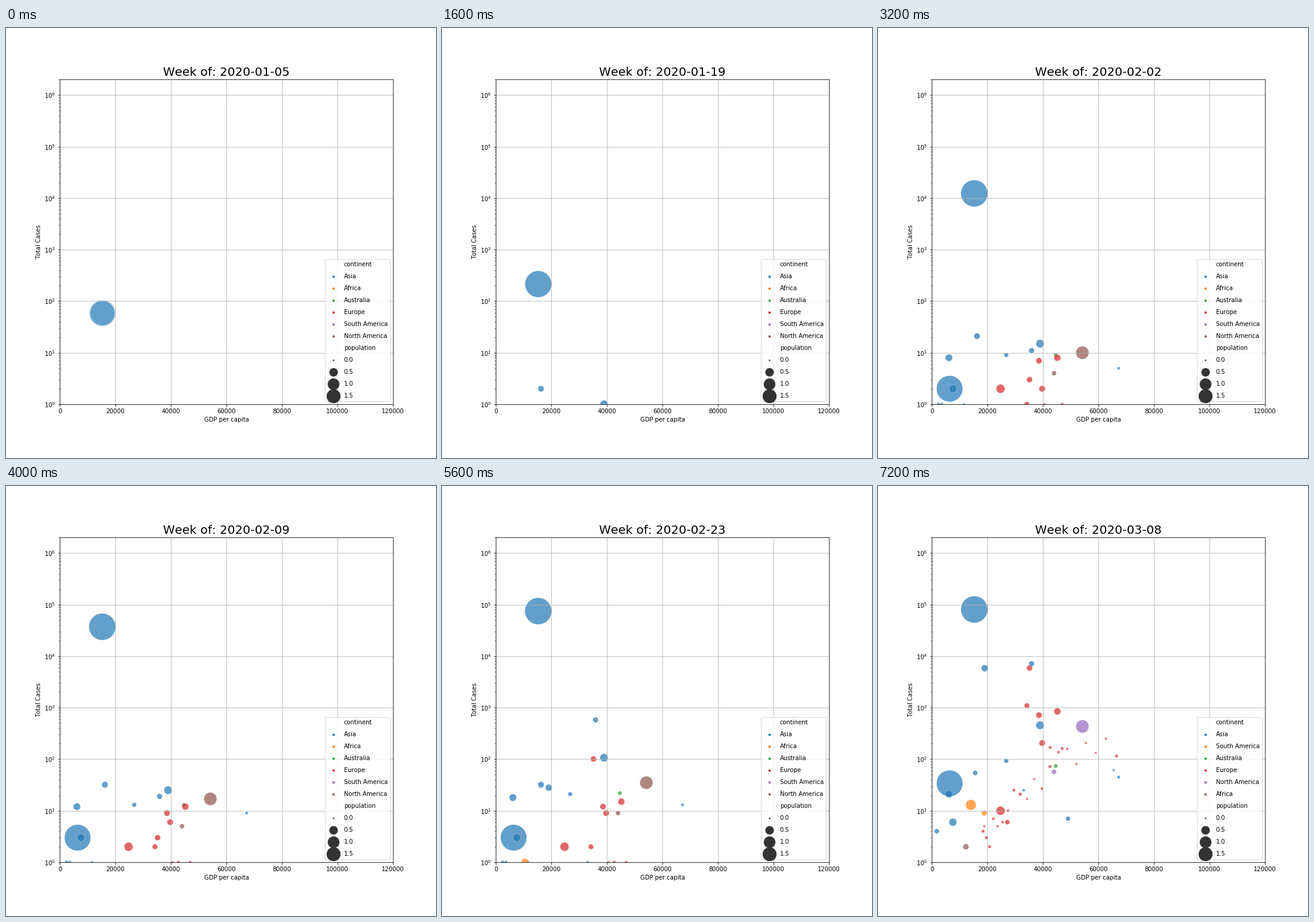
These frames come from a looping animation (720 px wide and 720 px high, 8 s). A matplotlib script:

```python
import numpy as np
import matplotlib.pyplot as plt
from matplotlib.animation import FuncAnimation
from matplotlib.ticker import LogLocator, NullFormatter

plt.rcParams["text.kerning_factor"] = 6

WEEKS = 10
LAST = WEEKS - 1
START = np.datetime64("2020-01-05")
ORDER = ["Asia", "Africa", "Australia", "Europe", "South America", "North America"]
LAST_ORDER = ["Asia", "South America", "Australia", "Europe", "North America", "Africa"]
MAX_MILLIONS = 1439

rng = np.random.default_rng(7)
countries = []


def add(continent, gdp, millions, curve):
    """Register a country: GDP in thousands, population, cases by week."""
    countries.append((continent, 1000 * gdp, millions, curve))


def saturate(low, high, scale, power):
    """Cases climb from 10**low and level off at 10**high."""
    def cases(week):
        t = max(week - 1, 0)
        return 10 ** (high - (high - low) * np.exp(-((t / scale) ** power)))
    return cases


def outbreak(first, start, bend=None, mid=None, last=0, ease=1):
    """Cases simmer from start to mid, then surge; last=0 drops the final week."""
    if bend is None:
        bend, mid = first, start

    def cases(week):
        if week < first or (week == LAST and not last):
            return 0
        if week < bend:
            a, b, u = start, mid, ((week - first) / (bend - first)) ** 0.45
        else:
            a, b, u = mid, last or mid, ((week - bend) / max(LAST - bend, 1)) ** ease
        return np.ceil(a * (b / a) ** u - 1e-6)
    return cases


def area(millions):
    return 10 + 1990 * min(millions / MAX_MILLIONS, 1)


# Large or early countries
add("Asia", 15.31, 1439, saturate(1.771, 4.908, 2.53, 1.75))
add("Asia", 6.43, 1380, outbreak(4, 2, 8, 3, last=34))
add("Asia", 5.03, 221, outbreak(8, 4))
add("Asia", 7.6, 110, outbreak(4, 2, 8, 3, last=6))
add("Asia", 6.17, 97, outbreak(3, 2, 6, 16, last=21))
add("Asia", 16.28, 70, outbreak(2, 2, 5, 32))
add("Asia", 39, 126, outbreak(2, 1, 5, 25, last=455))
add("Asia", 26.81, 32, outbreak(3, 3, 8, 25, last=93))
add("Asia", 67.29, 10, outbreak(4, 5, 7, 13, last=45))
add("Asia", 65.53, 4, outbreak(8, 45, last=61))
add("Asia", 19.08, 84, outbreak(7, 28, last=5823, ease=0.8))
add("Asia", 15.66, 40, outbreak(8, 13, last=54))
add("Asia", 33.13, 9, outbreak(7, 1, last=25))
add("Asia", 49.05, 35, outbreak(9, 7, last=7))
add("Asia", 1.8, 39, outbreak(8, 1, last=4))
for gdp in (2.44, 3.65, 11.67):
    add("Asia", gdp, 60 / (gdp + 1), outbreak(4, 1))

add("Australia", 44.65, 25, outbreak(3, 3, 8, 26, last=74))

add("Europe", 45.23, 84, outbreak(4, 8, 7, 15, last=847))
add("Europe", 38.61, 65, outbreak(3, 3, 7, 12, last=716))
add("Europe", 39.75, 68, outbreak(4, 2, 7, 9, last=206, ease=1.7))
add("Europe", 35.22, 60, outbreak(4, 3, 6, 3, last=5883, ease=0.7))
add("Europe", 34.27, 47, outbreak(4, 1, 7, 2, last=1095, ease=0.75))
add("Europe", 24.77, 146, outbreak(4, 2, 8, 2, last=10))
add("Europe", 40.59, 5, outbreak(4, 1))
add("Europe", 46.95, 10, outbreak(4, 1, 7, 1, last=161))
add("Europe", 42.66, 12, outbreak(5, 1, 8, 1, last=169))
add("Europe", 27.22, 38, outbreak(9, 6, last=6))
add("Asia", 35.94, 51, outbreak(3, 2, 6, 28, last=7134, ease=0.55))

add("North America", 54.23, 331, outbreak(3, 2, 7, 35, last=433, ease=2))
add("North America", 44.02, 38, outbreak(3, 1, 7, 9, last=57))
add("North America", 17.34, 129, outbreak(8, 4))
add("South America", 14.1, 213, outbreak(8, 2, last=13))
add("South America", 18.93, 45, outbreak(9, 9, last=9))
add("Africa", 10.55, 102, outbreak(6, 1))
add("Africa", 13.91, 44, outbreak(8, 3))
add("Africa", 5.34, 206, outbreak(8, 1))
add("Africa", 12.3, 59, outbreak(9, 2, last=2))

# Small European countries: richer ones are hit earlier and harder
for u in np.linspace(0, 1, 21):
    gdp = 18.5 + 48 * u ** 1.6
    level = min(0.4 + 0.06 * (gdp - 18), 2.2) + rng.uniform(-0.3, 0.3)
    total = np.ceil(10 ** level)
    curve = (outbreak(8, np.ceil(total / 12), last=total) if total > 11
             else outbreak(9, total, last=total))
    add("Europe", gdp, rng.uniform(1, 14), curve)

# Scattered first cases along the bottom edge
for i in range(10):
    add(("Asia", "Europe")[i % 2], 8.8 + 60 * rng.random() ** 2,
        rng.uniform(1, 8), outbreak(8, 1))

fig, ax = plt.subplots(figsize=(10, 10), dpi=72)
fig.subplots_adjust(left=0.125, right=0.9, bottom=0.125, top=0.88)
ax.set_yscale("log")
ax.set_xlim(0, 120000)
ax.set_ylim(1, 2e6)
ax.yaxis.set_major_locator(LogLocator(numticks=20))
ax.yaxis.set_minor_locator(LogLocator(subs=np.arange(2, 10), numticks=99))
ax.yaxis.set_minor_formatter(NullFormatter())
ax.set_xlabel("GDP per capita")
ax.set_ylabel("Total Cases")
ax.grid()
title = ax.set_title("", fontsize=20)
bubbles = ax.scatter([], [], alpha=0.7, edgecolors="w")


def key(label, color, size):
    return ax.scatter([], [], s=size, color=color, linewidths=1, label=label)


handles = [key("continent", "none", 1)]
handles += [key(name, f"C{i}", 36) for i, name in enumerate(ORDER)]
handles += [key("population", "none", 1)]
handles += [key(f"{b:.1f}", "0.2", area(1000 * b)) for b in (0, 0.5, 1, 1.5)]
legend = ax.legend(handles=handles, loc="lower right", labelspacing=1, markerscale=0.5)


def update(week):
    order = LAST_ORDER if week == LAST else ORDER
    shown = [(gdp, curve(week), area(millions), f"C{order.index(continent)}")
             for continent, gdp, millions, curve in countries if curve(week) > 0]
    gdps, cases, sizes, colors = zip(*shown)
    bubbles.set_offsets(np.column_stack([gdps, cases]))
    bubbles.set_sizes(np.array(sizes))
    bubbles.set_facecolor(colors)
    # Edges thin out as smaller countries join
    bubbles.set_linewidth(0.08 * np.sqrt(np.percentile(sizes, 10)))
    for text, name in zip(legend.get_texts()[1:7], order):
        text.set_text(name)
    title.set_text(f"Week of: {START + 7 * week}")
    return bubbles, title


anim = FuncAnimation(fig, update, frames=WEEKS, interval=800, repeat=True,
                     repeat_delay=0, blit=False)
plt.show()
```
